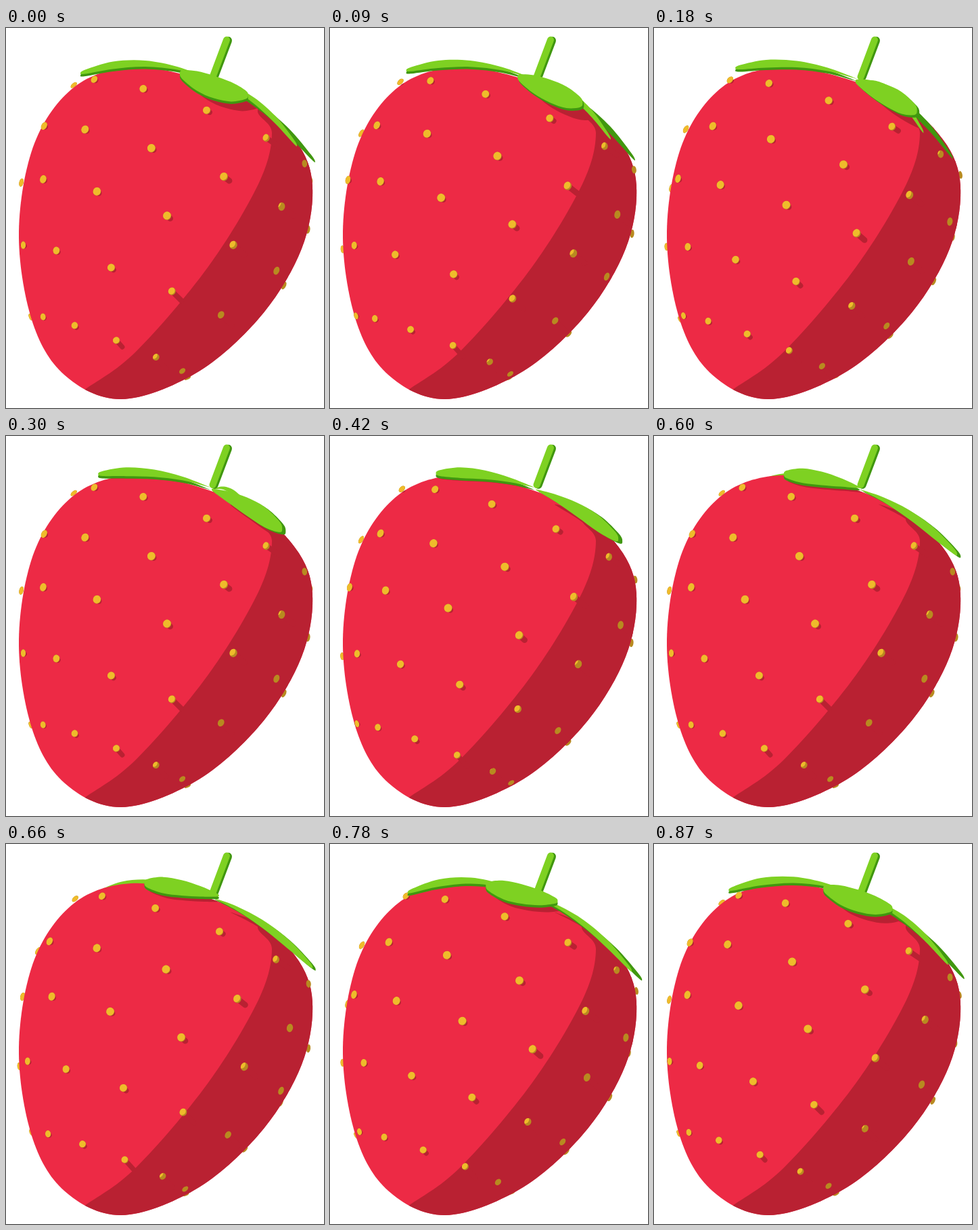
Animation, 470 px wide and 560 px high, one loop 0.9 s. Source, as an HTML page with a canvas:

```html
<!DOCTYPE html>
<html lang="en">
<head>
<meta charset="utf-8">
<title>Spinning strawberry</title>
<style>
  html, body { margin: 0; width: 100%; height: 100%; overflow: hidden; background: #fff; }
  canvas { display: block; }
</style>
</head>
<body>
<canvas id="stage" width="470" height="560"></canvas>
<script>
const ctx = document.getElementById('stage').getContext('2d');
const RED = '#ed2a45', SHADE = '#b92132';
const GREEN = '#7ed122', DEEP_GREEN = '#40970f';
const YELLOW = '#efbb2b', OCHRE = '#b88a20';
const LOOP = 900, STEP = 30, SEED_TURN = 0.545;

const clamp = (v, lo, hi) => Math.min(hi, Math.max(lo, v));
// Rounded V: flat near zero, then a steady slope.
const bend = v => Math.hypot(v, 0.4) - 0.4;

// Closed smooth curve through [x, y] points.
function blob(pts) {
  const path = new Path2D(), n = pts.length;
  const at = i => pts[(i + n) % n];
  const handle = (i, side) => at(i).map((v, k) => v + side * (at(i + 1)[k] - at(i - 1)[k]) / 6);
  path.moveTo(...at(0));
  for (let i = 0; i < n; i++) {
    path.bezierCurveTo(...handle(i, 1), ...handle(i + 1, -1), ...at(i + 1));
  }
  path.closePath();
  return path;
}

const body = blob([
  [185, 58], [285, 75], [378, 117], [438, 181], [453, 250], [432, 337], [372, 430],
  [280, 509], [170, 547], [86, 511], [38, 430], [19, 300], [42, 170], [101, 87]
]);
const shade = blob([
  [60, 575], [112, 536], [192, 477], [298, 353], [373, 230], [393, 155], [375, 115],
  [470, 60], [520, 300], [480, 580]
]);

// Each row of seeds runs along a tilted ellipse around the fruit.
const seedRow = (x, y, rx, ry, lift, start) => ({ x, y, rx, ry, lift, start });
const rows = [
  seedRow(276.5, 152, 176.5, 66, 38.5, 2.79),
  seedRow(246.5, 226.7, 200.5, 74, 38.4, 3.29),
  seedRow(218, 302, 195.5, 73, 33, 3.81),
  seedRow(185.5, 387, 167.5, 63, 23, 3.33),
  seedRow(153, 470, 116.5, 44, 13.5, 3.84)
];

function seedsAt(phase) {
  const seeds = [];
  rows.forEach((row, i) => {
    for (let k = -1; k < 9; k++) {
      const a = (k + phase - row.start) * SEED_TURN;
      if (Math.abs(a) > 1.95) continue;
      seeds.push({
        i, a,
        r: 6.4 - 0.5 * Math.abs(i - 1.5),
        x: row.x + row.rx * Math.sin(a),
        y: row.y + row.ry * Math.sin(a) - row.lift * Math.cos(a),
        front: Math.abs(a) < 1.4
      });
    }
  });
  return seeds;
}

function drawSeed({ i, a, r, x, y }) {
  const turn = 0.33 + a * 0.2 * (i - 1.7);
  const narrow = r * (0.5 + 0.5 * Math.max(0, Math.cos(a)));
  const shape = new Path2D();
  shape.ellipse(x, y, narrow, r, turn, 0, 7);
  fill(shape, OCHRE);

  // The lit part slides off as the seed turns away from the light.
  const dusk = clamp((a + 1.5) / (2.65 - 0.05 * i), 0, 1);
  if (dusk === 1) return;
  const slide = r * (0.2 * dusk + 2 * dusk ** 9);
  const lit = new Path2D();
  lit.ellipse(x - slide * 0.75, y - slide * 0.65, narrow, r, turn, 0, 7);
  ctx.save();
  ctx.clip(shape);
  fill(lit, YELLOW);
  ctx.restore();
}

// The cast shadow lengthens as a seed nears the dark side.
function drawSeedShadow({ i, a, r, x, y }) {
  const growth = 13 * Math.exp(5 * (a - 0.55 + 0.025 * i * i));
  const length = Math.min(26, r * 0.9 + 2.5 * Math.cos(a) + growth) - r * 0.7;
  const dir = 0.6 + 0.06 * i;
  line(x, y, x + length * Math.cos(dir), y + length * Math.sin(dir), r * 1.4, SHADE);
}

// A paddle between two ends: arched midline, thickest towards its tip.
function paddle(from, to, arch, thick, lean) {
  const edge = (s, side) => {
    const round = 4 * s * (1 - s);
    const half = thick * Math.sqrt(round) * (1 + lean * (2 * s - 1));
    return [
      from[0] + (to[0] - from[0]) * s,
      from[1] + (to[1] - from[1]) * s + arch * round + side * half
    ];
  };
  const stops = [0.04, 0.25, 0.5, 0.75, 0.96];
  return blob([
    from, ...stops.map(s => edge(s, -1)),
    to, ...stops.reverse().map(s => edge(s, 1))
  ]);
}

// Leaf by its turn q: 0 points left, 1 to the front, 2 right.
function leafAt(q) {
  const u = q - 1, away = clamp(Math.abs(u), 0, 1.2);
  const sink = 35 * Math.max(0, -q);
  const left = [
    Math.min(304, 110 + 217 * bend(q)),
    Math.min(79, 55 + 48 * (Math.max(0, q) - 0.5) ** 2) + sink
  ];
  const right = [
    Math.max(302, 459 - 173 * bend(q - 1.9)),
    Math.max(76, 99 + 113 * u - 140 * Math.max(0, u - 0.87)) + sink
  ];
  const arch = 4 - 23 * away;
  const thick = 4.5 + 12.5 * Math.exp(-(((q - 1.08) / 0.45) ** 2));
  const lean = 0.8 * clamp(2 * u, -1, 1);
  const reach = 1 - 0.7 * Math.max(0, q - 1.75);
  const litEnd = right.map((v, k) => left[k] + (v - left[k]) * reach);
  return {
    q,
    top: paddle(left, litEnd, arch, thick, lean),
    under: paddle(left, right, arch, thick, lean),
    shift: 6 * Math.sin(Math.PI * clamp(u, 0, 1)),
    back: q < -0.15 || q > 2.2
  };
}

function fill(path, color) {
  ctx.fillStyle = color;
  ctx.fill(path);
}

function line(x1, y1, x2, y2, width, color) {
  ctx.strokeStyle = color;
  ctx.lineWidth = width;
  ctx.beginPath();
  ctx.moveTo(x1, y1);
  ctx.lineTo(x2, y2);
  ctx.stroke();
}

function fillShifted(path, dx, dy, color) {
  ctx.save();
  ctx.translate(dx, dy);
  fill(path, color);
  ctx.restore();
}

function drawLeaf(leaf) {
  fillShifted(leaf.under, leaf.shift, 3.5, DEEP_GREEN);
  fill(leaf.top, GREEN);
}

function drawLeafShadow(leaf) {
  const s = clamp(leaf.q / 1.2, 0, 1) ** 3;
  fillShifted(leaf.under, 28 * s, 3 + 19 * s, SHADE);
}

function drawStem() {
  line(328.3, 18.5, 308, 72, 11.5, DEEP_GREEN);
  line(326, 17.5, 305.5, 72, 10, GREEN);
}

function draw(time) {
  const t = Math.floor((time % LOOP) / STEP) * STEP / LOOP;
  const seeds = seedsAt((t * 3) % 1);
  const frontSeeds = seeds.filter(s => s.front);
  const leaves = [-1, 0, 1, 2].map(k => t + k)
    .filter(q => q > -0.45 && q < 2.35).map(leafAt)
    .sort((a, b) => Math.abs(b.q - 1) - Math.abs(a.q - 1));
  const nearLeaves = leaves.filter(l => !l.back);

  ctx.fillStyle = '#fff';
  ctx.fillRect(0, 0, 470, 560);
  ctx.lineCap = 'round';
  leaves.filter(l => l.back).forEach(drawLeaf);
  seeds.filter(s => !s.front).forEach(drawSeed);
  fill(body, RED);

  ctx.save();
  ctx.clip(body);
  fill(shade, SHADE);
  nearLeaves.forEach(drawLeafShadow);
  frontSeeds.forEach(drawSeedShadow);
  ctx.restore();

  frontSeeds.forEach(drawSeed);
  drawStem();
  nearLeaves.forEach(drawLeaf);
}

function tick() {
  draw(performance.now());
  requestAnimationFrame(tick);
}
tick();
</script>
</body>
</html>
```
